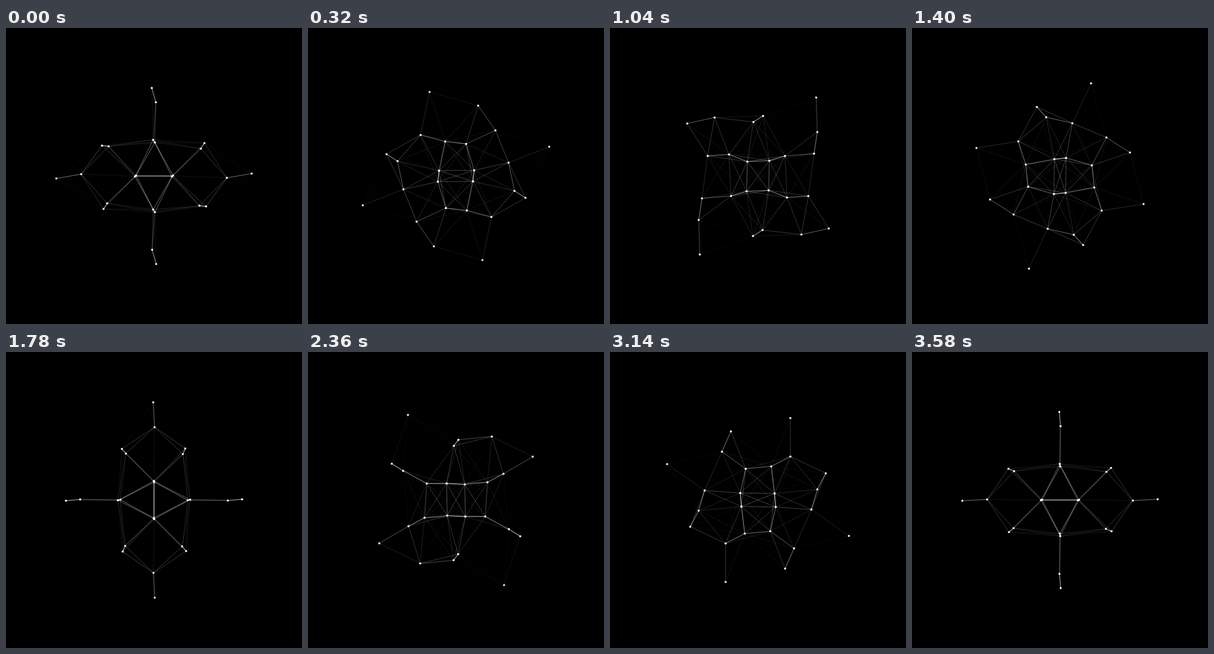
These frames come from a looping animation (500 by 500 pixels, 3600 ms). An HTML page with a canvas:

```html
<!DOCTYPE html>
<html lang="en">
<head>
<meta charset="utf-8">
<title>Counter-rotating network</title>
<style>
html, body { margin: 0; width: 100%; height: 100%; overflow: hidden; background: #000; }
canvas { display: block; width: 500px; height: 500px; }
</style>
</head>
<body>
<canvas id="stage" width="500" height="500"></canvas>
<script>
const ctx = document.getElementById('stage').getContext('2d');
const LOOP = 3600, STEP = 20;
const REACH = 100, DOT = 1.7;
const SAMPLES = 4, SHUTTER = 0.6;
const RAD = Math.PI / 180;
const TILT = Math.atan((Math.sqrt(5) - 1) / 2) / RAD;

// Each ring: start angle, radius turning left, radius turning right.
const rings = [
  [0, 165.1, 123.1],
  [90, 148.9, 124.7],
  [TILT, 101.9, 91.6],
  [-TILT, 101.9, 91.6],
  [90, 61.1, 56.8],
  [0, 32.2, 30.2]
];

const polar = (radius, degrees) => ({
  x: 250 + radius * Math.cos(degrees * RAD),
  y: 250 - radius * Math.sin(degrees * RAD)
});

function pointsAt(turn) {
  return rings.flatMap(([start, left, right]) => [0, 180].flatMap(half => [
    polar(left, start + half + turn),
    polar(right, start + half - turn)
  ]));
}

function drawNetwork(points, weight) {
  ctx.strokeStyle = ctx.fillStyle = '#fff';
  ctx.lineWidth = 1;
  points.forEach((a, i) => {
    for (const b of points.slice(i + 1)) {
      const gap = Math.hypot(a.x - b.x, a.y - b.y);
      if (gap >= REACH) continue;
      ctx.globalAlpha = weight * Math.pow(1 - gap / REACH, 1.5);
      ctx.beginPath();
      ctx.moveTo(a.x, a.y);
      ctx.lineTo(b.x, b.y);
      ctx.stroke();
    }
  });
  ctx.globalAlpha = weight;
  for (const p of points) {
    ctx.beginPath();
    ctx.arc(p.x, p.y, DOT, 0, 2 * Math.PI);
    ctx.fill();
  }
}

function render(ms) {
  const frame = Math.floor((ms % LOOP) / STEP + 0.001);
  ctx.globalCompositeOperation = 'source-over';
  ctx.globalAlpha = 1;
  ctx.fillStyle = '#000';
  ctx.fillRect(0, 0, 500, 500);
  // Short exposure: blend a few moments around the frame.
  ctx.globalCompositeOperation = 'lighter';
  for (let s = 0; s < SAMPLES; s++) {
    const shift = SHUTTER * ((s + 0.5) / SAMPLES - 0.5);
    drawNetwork(pointsAt(1.45 + (frame + shift) * STEP * 180 / LOOP), 1 / SAMPLES);
  }
}

const begin = performance.now();
function tick() {
  render(performance.now() - begin);
  requestAnimationFrame(tick);
}
tick();
</script>
</body>
</html>
```
